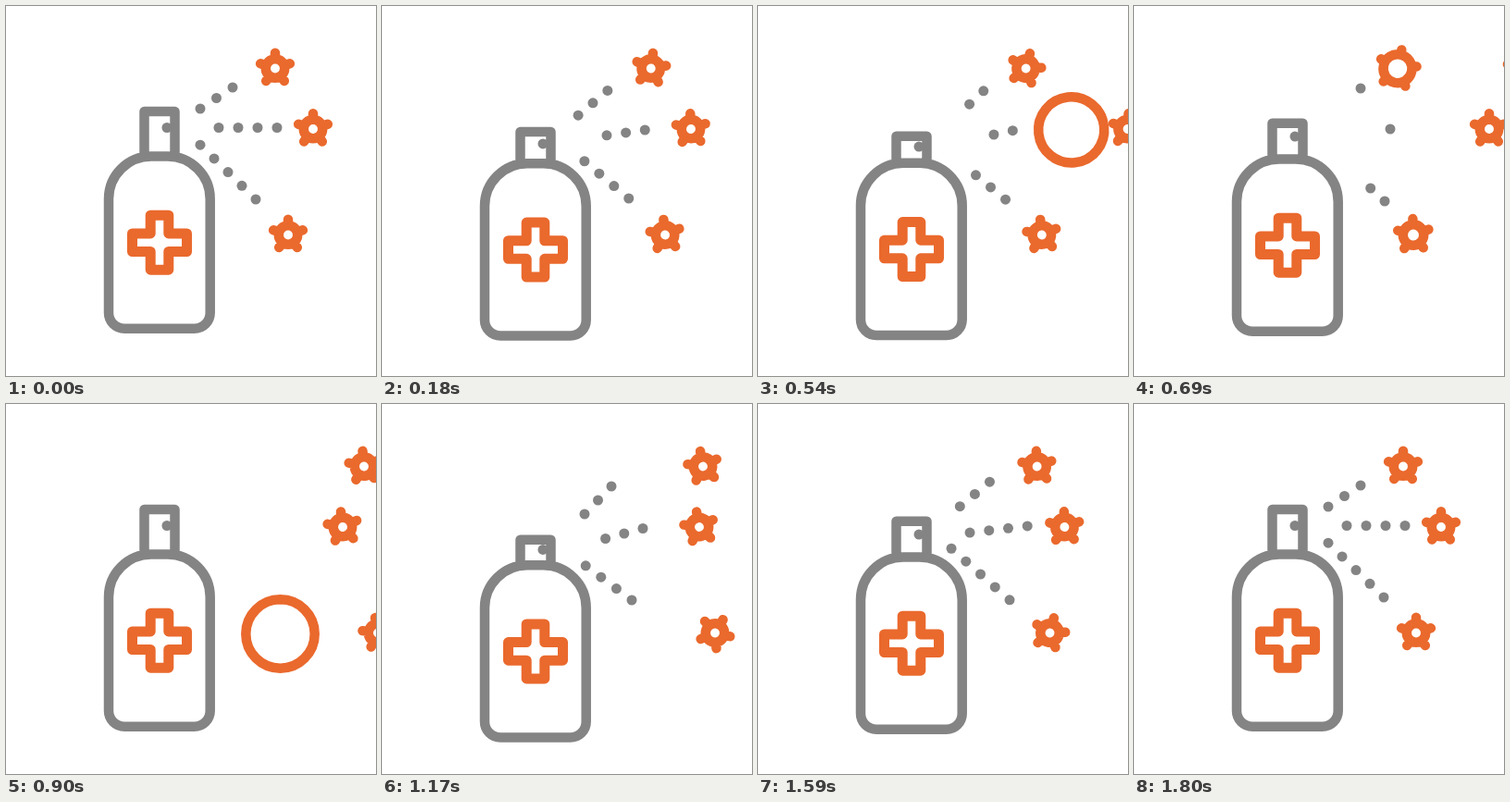
An HTML page with a canvas that plays this animation: 400x400 px, repeating every 1830 ms.

```html
<!DOCTYPE html>
<html lang="en">
<head>
<meta charset="utf-8">
<title>Disinfectant spray</title>
<style>
  html, body { margin: 0; height: 100%; overflow: hidden; background: #fff; }
  canvas { display: block; }
</style>
</head>
<body>
<canvas id="stage" width="400" height="400"></canvas>
<script>
const ctx = document.getElementById('stage').getContext('2d');
const LOOP = 1830, CYCLE = 1800, PRESS = 900, STEP = 30;
const GRAY = '#848484', ORANGE = '#ea692d';

const ease = (t, from, to) => {
  const p = Math.min(1, Math.max(0, (t - from) / (to - from)));
  return (1 - Math.cos(Math.PI * p)) / 2;
};

// Smooth curve through the points (times[i], values[i]).
function curve(times, values, t) {
  const last = times.length - 1;
  let i = 0;
  while (i < last - 1 && t >= times[i + 1]) i++;
  const slope = k => {
    const a = Math.max(0, k - 1), b = Math.min(last, k + 1);
    return (values[b] - values[a]) / (times[b] - times[a]);
  };
  const h = times[i + 1] - times[i], s = (t - times[i]) / h, r = 1 - s;
  return values[i] * (1 + 2 * s) * r * r + values[i + 1] * s * s * (3 - 2 * s) +
    h * s * r * (slope(i) * r - slope(i + 1) * s);
}

function dot(x, y, r) {
  ctx.beginPath();
  ctx.arc(x, y, r, 0, 2 * Math.PI);
  ctx.fill();
}

function drawBottle(t) {
  const local = t % PRESS;
  const sink = 12 * ease(local, 0, 300) * (1 - ease(local, 270, 900));
  const push = 21.5 * ease(local, 0, 300) * (1 - ease(local, 450, 900));
  ctx.save();
  ctx.translate(0, sink);
  ctx.strokeStyle = ctx.fillStyle = GRAY;
  ctx.lineWidth = 10.5;
  ctx.beginPath();
  ctx.roundRect(111, 162.5, 109.7, 186.2, [46, 46, 17, 17]);
  ctx.moveTo(149.5, 162);
  ctx.lineTo(149.5, 114 + push);
  ctx.lineTo(182.5, 114 + push);
  ctx.lineTo(182.5, 162);
  ctx.stroke();
  dot(174, 131.5 + 0.68 * push, 5.5);

  ctx.strokeStyle = ORANGE;
  ctx.lineWidth = 11;
  ctx.translate(166, 255.7);
  ctx.beginPath();
  for (let i = 0; i < 4; i++) {
    ctx.lineTo(-9.8, -9.8);
    ctx.lineTo(-9.8, -29.5);
    ctx.lineTo(9.8, -29.5);
    ctx.rotate(Math.PI / 2);
  }
  ctx.closePath();
  ctx.stroke();
  ctx.restore();
}

// Each jet: outermost dot (x, y), step back to the next dot (dx, dy), nearest x shown.
const jetTimes = [0, 390, 690, 1170, 1410, 1800];
const jets = [
  { near: 209, x: [245, 243, 245, 248, 253.5, 245], y: [88, 94, 89, 89, 82.5, 88],
    dx: [17.5, 14.5, 16, 14.5, 15, 17.5], dy: [-11.5, -15, -13.5, -15, -14.5, -11.5] },
  { near: 229, x: [293, 276, 277, 282, 289, 293], y: [131.5, 136, 133, 134.5, 132.5, 131.5],
    dx: [21, 20.3, 20.5, 20.2, 20.5, 21], dy: [0, -5.4, -3, -5.5, -4.2, 0] },
  { near: 209, x: [270, 264.5, 271, 270, 273, 270], y: [209, 207.5, 211, 212, 213.5, 209],
    dx: [15, 16.7, 15.3, 16.6, 16.3, 15], dy: [14.7, 12.4, 14, 12.4, 13.2, 14.7] }
];

function drawJet(jet, t) {
  const [x, y, dx, dy] = ['x', 'y', 'dx', 'dy'].map(k => curve(jetTimes, jet[k], t));
  const near = jet.near + (t < PRESS ? Math.max(0, t - 450) * 0.14 : 0);
  const delay = t < PRESS ? 0 : 5 * Math.max(0, 1 - (t - PRESS) / 240);
  ctx.fillStyle = GRAY;
  for (let i = 0; i < 5; i++) {
    const n = i + delay;
    if (x - dx * n >= near) dot(x - dx * n, y - dy * n, 5.5);
  }
}

// Germs drift in from the right over more than one cycle, then swell and pop.
const germTimes = [390, 690, 900, 1170, 1410, 1800, 2190, 2490, 2700];
const germs = [
  { y: 67.5, pop: 2420, x: [464, 420, 387, 347, 316, 291, 293, 285, 280],
    turn: [0, -2, -5, -10, -4, 0, 16, 12, 10] },
  { y: 133, pop: 2138, x: [415.5, 384, 364, 343, 333, 332, 337, 340, 340],
    turn: [6, 0, -7, -10, -5, 0, -6, -6, -6] },
  { y: 247.5, pop: 2460, x: [480, 436, 402, 360, 330, 305, 310, 302, 296.5],
    turn: [-20, -20, -10, 31, 28, 0, -8, -2, 0] }
];

function drawGerm(germ, t) {
  if (t < 330 || t > germ.pop + 250) return;
  const swell = ease(t, germ.pop, germ.pop + 240);
  const radius = 10.2 + 27 * swell, reach = 16.7 + 20.3 * swell;
  ctx.save();
  ctx.translate(curve(germTimes, germ.x, t), germ.y + swell);
  ctx.rotate(curve(germTimes, germ.turn, t) * Math.PI / 180);
  ctx.strokeStyle = ORANGE;
  ctx.lineWidth = 10.5;
  ctx.beginPath();
  ctx.arc(0, 0, radius, 0, 2 * Math.PI);
  for (let i = 0; i < 5; i++) {
    ctx.moveTo(0, -radius);
    ctx.lineTo(0, -reach);
    ctx.rotate(2 * Math.PI / 5);
  }
  ctx.stroke();
  ctx.restore();
}

ctx.lineJoin = ctx.lineCap = 'round';
const start = performance.now();

function draw() {
  const elapsed = Math.max(0, performance.now() - start) % LOOP;
  const t = Math.floor(elapsed / STEP) * STEP % CYCLE;
  ctx.clearRect(0, 0, 400, 400);
  drawBottle(t);
  for (const jet of jets) drawJet(jet, t);
  for (const germ of germs) {
    drawGerm(germ, t);
    drawGerm(germ, t + CYCLE);
  }
  requestAnimationFrame(draw);
}
draw();
</script>
</body>
</html>
```
